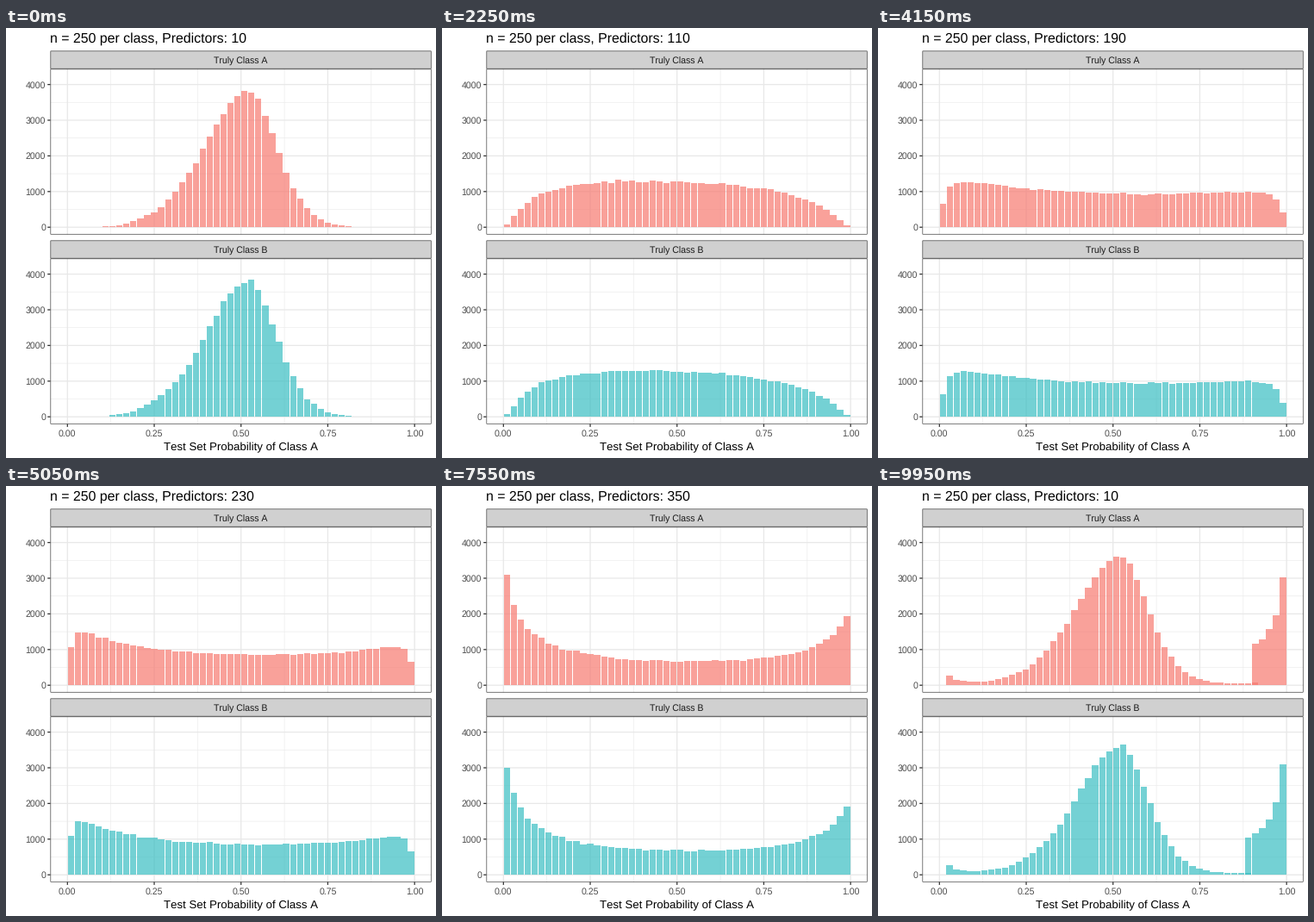
A matplotlib script that plays this animation: 499x499 px, repeating every 10000 ms.

```python
import math

import matplotlib.pyplot as plt
import numpy as np
from matplotlib.animation import FuncAnimation
from matplotlib.collections import PolyCollection
from matplotlib.patches import Rectangle

plt.rcParams["font.family"] = "Liberation Sans"
plt.rcParams["text.hinting"] = "none"
plt.rcParams["text.kerning_factor"] = 6

SIZE, DPI = 499, 64
PX = 72 / DPI
LEFT, RIGHT = 51.5, 493.6
X0, XW = 71.3, 402.85
Y0, YK = 231.2, 0.0414
PANEL_STEP = 220
BINS = 50
STEP = XW / BINS
GAP = 0.1 * STEP
LINE = 1.28
STATES = 45

# Shape of the fitted log-odds: predictors, spread, mode
KEYS = np.array([
    (10, 0.433, 0.08), (45, 0.805, -0.05), (195, 1.68, -0.155),
    (280, 2.0, -0.22), (350, 2.342, -0.262), (450, 2.664, -0.227),
])


def phi(z):
    return 0.5 * (1 + math.erf(z / math.sqrt(2)))


def split_cdf(x, mode, low, high):
    """CDF of a normal with different spreads on each side of the mode."""
    if x < mode:
        return 2 * low * phi((x - mode) / low) / (low + high)
    return (low + high * (2 * phi((x - mode) / high) - 1)) / (low + high)


def expected(p):
    """Expected histogram of 50000 probabilities fitted with p predictors."""
    root = np.sqrt(KEYS[:, 0])
    spread = np.interp(math.sqrt(p), root, KEYS[:, 1])
    mode = np.interp(math.sqrt(p), root, KEYS[:, 2])
    skew = 0.2 * math.exp(-(p - 10) / 15)
    vary = 0.35 * math.exp(-p / 70)
    scales = [spread * math.exp(v) for v in (-vary, 0, vary)]
    cdf = [0.0]
    for i in range(1, BINS):
        odds = math.log(i / (BINS - i))
        cdf.append(sum(split_cdf(odds, mode, s * (1 + skew), s * (1 - skew))
                       for s in scales) / 3)
    return 50000 * np.diff(cdf + [1.0])


def occupied(p, cls):
    """Bins that hold any data; the range widens with more predictors."""
    if p == 10:
        return np.arange(1, 46 - cls)
    if p < 60 - 10 * cls:
        return np.arange(1, 49)
    return np.arange(BINS)


def class_states(cls):
    rng = np.random.default_rng(21 + cls)
    states = []
    for p in range(10, 10 * STATES + 1, 10):
        mean = expected(p)
        noise = 0.6 * np.sqrt(mean) * rng.normal(size=BINS)
        bins = occupied(p, cls)
        states.append((bins, np.maximum(mean + noise, 0)[bins]))
    return states


def build_schedule():
    """List of (state, progress to the next state), one entry per frame."""
    slots = []
    for k in range(STATES):
        held = k in (0, 4, 6, 7, 9, 12) if k < 14 else k % 5 in (2, 4)
        moves = 4 if k == 2 else 3
        slots += [(k, 0.0)] * (2 if held else 1)
        slots += [(k, j / (moves + 1)) for j in range(1, moves + 1)]
    return slots


def cubic_in_out(t):
    return 4 * t ** 3 if t < 0.5 else 1 - 4 * (1 - t) ** 3


def blend(start, end, t):
    """Match bars by order; unmatched old bars stay until the move ends."""
    if t == 0:
        return start
    n = min(len(start[0]), len(end[0]))
    mixed = []
    for a, b in zip(start, end):
        values = np.array(a, float)
        values[:n] += (b[:n] - values[:n]) * t
        mixed.append(values)
    return mixed


def bar_verts(bins, counts, base):
    left = X0 + bins * STEP + GAP / 2
    right = left + STEP - GAP
    top = base - counts * YK
    low = np.full(len(left), base)
    return np.stack([np.stack([left, low], 1), np.stack([left, top], 1),
                     np.stack([right, top], 1), np.stack([right, low], 1)], 1)


fig = plt.figure(figsize=(SIZE / DPI, SIZE / DPI), dpi=DPI, facecolor="white")
ax = fig.add_axes([0, 0, 1, 1])
ax.set_xlim(0, SIZE)
ax.set_ylim(SIZE, 0)
ax.axis("off")


def text(x, y, label, size, color="black", ha="center"):
    return ax.text(x, y, label, fontsize=size * PX, color=color, ha=ha,
                   va="baseline", zorder=7)


def line(xs, ys, color, width=LINE, z=1):
    ax.plot(xs, ys, color=color, lw=width * PX, zorder=z,
            solid_capstyle="butt", snap=False)


def box(top, bottom, fill, z):
    """Box whose outline is clipped to its inner half."""
    inset = LINE / 4
    ax.add_patch(Rectangle((LEFT + inset, top + inset),
                           RIGHT - LEFT - 2 * inset, bottom - top - 2 * inset,
                           fc=fill, ec="#333333", lw=LINE / 2 * PX, zorder=z,
                           joinstyle="miter", snap=False))


def draw_panel(shift, name):
    top, bottom, base = 47.5 + shift, 239.6 + shift, Y0 + shift
    for v in range(500, 4000, 1000):
        line([LEFT, RIGHT], [base - v * YK] * 2, "#ebebeb", LINE / 2)
    for v in (0.125, 0.375, 0.625, 0.875):
        line([X0 + v * XW] * 2, [top, bottom], "#ebebeb", LINE / 2)
    for v in range(0, 4001, 1000):
        y = base - v * YK
        line([LEFT, RIGHT], [y, y], "#e8e8e8", z=2)
        line([LEFT - 3.3, LEFT], [y, y], "#333333", z=5)
        text(46, y + 3.8, str(v), 10.56, "#4d4d4d", "right")
    for v in np.arange(5) / 4:
        line([X0 + v * XW] * 2, [top, bottom], "#e8e8e8", z=2)
    box(top, bottom, "none", 5)
    box(26.5 + shift, top, "#d0d0d0", 6)
    text((LEFT + RIGHT) / 2, 41.6 + shift, name, 10.56, "#1a1a1a")


draw_panel(0, "Truly Class A")
draw_panel(PANEL_STEP, "Truly Class B")
for v in np.arange(5) / 4:
    x = X0 + v * XW
    line([x, x], [459.6, 462.9], "#333333", z=5)
    text(x, 474.1, f"{v:.2f}", 10.56, "#4d4d4d")
text((LEFT + RIGHT) / 2, 490, "Test Set Probability of Class A", 13.2)
title = text(LEFT - 0.1, 17, "", 15.84, ha="left")

bars = []
for color in ("#f77970", "#39bec2"):
    group = PolyCollection([], facecolors=color, edgecolors="none",
                           linewidths=0, alpha=0.7, zorder=3)
    ax.add_collection(group, autolim=False)
    bars.append(group)

histograms = [class_states(0), class_states(1)]
schedule = build_schedule()


def update(frame):
    k, t = schedule[frame]
    following = (k + 1) % STATES
    for cls, group in enumerate(bars):
        states = histograms[cls]
        bins, counts = blend(states[k], states[following], cubic_in_out(t))
        group.set_verts(bar_verts(bins, counts, Y0 + cls * PANEL_STEP))
    closest = following if t > 0.5 else k
    title.set_text(f"n = 250 per class, Predictors: {10 * (closest + 1)}")
    return [*bars, title]


anim = FuncAnimation(fig, update, frames=len(schedule), interval=50,
                     init_func=lambda: update(0), repeat=True, repeat_delay=0)
plt.show()
```
